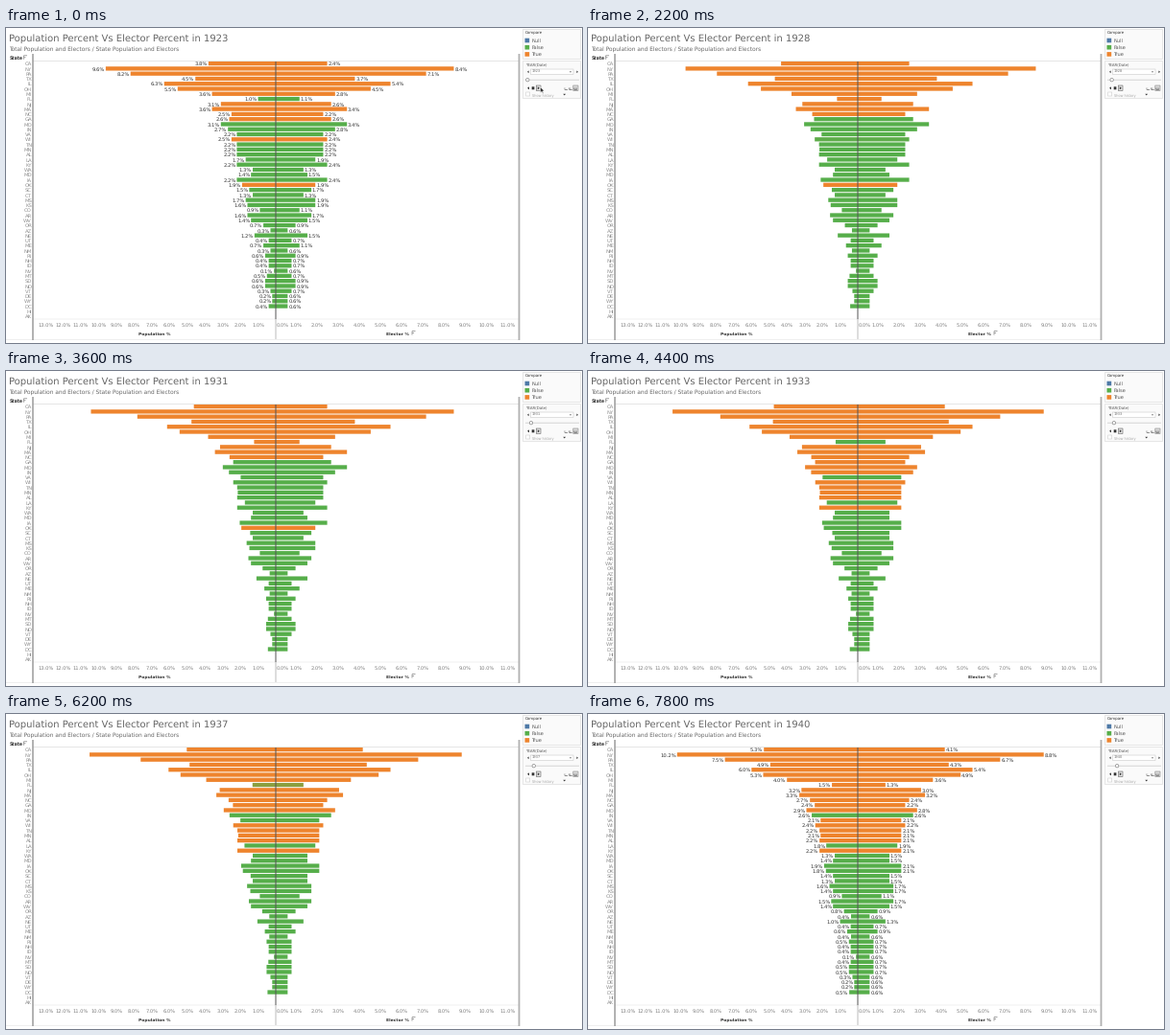
A matplotlib script that plays this animation: 600x329 px, repeating every 8 s.

```python
import numpy as np
import matplotlib.pyplot as plt
from matplotlib.animation import FuncAnimation
from matplotlib.colors import to_rgb
from matplotlib.patches import Circle, Polygon, Rectangle

W, H, DPI = 600, 329, 100
FRAMES, STEP = 40, 200
FIRST, MID, LAST, SEATS_CHANGE = 1923, 1930, 1940, 1932
FRAMES_PER_YEAR, LEAD = 2.3, 1.6
SETTLE, LABEL_AT = 0.5, 0.6       # shares of a year
ZERO, LEFT_UNIT, RIGHT_UNIT = 281, 18.45, 22.05
TOP, PITCH, BAR = 37.1, 5.28, 4.3
HOUSE, ALL_SEATS = 435, 535

GREEN, ORANGE, BLUE = "#56ae4a", "#ee842d", "#4e79a7"
DARK, GREY, PALE = "#333333", "#808080", "#d8d8d8"
plt.rcParams["text.hinting"] = "none"

STATES = ("CA NY PA TX IL OH MI FL NJ MA NC GA MO IN VA WI TN MN AL LA KY WA "
          "MD IA OK SC CT MS KS CO AR WV OR AZ NE UT ME NM RI NH ID NV MT SD "
          "ND VT DE WY DC HI AK").split()
N = len(STATES) - 2               # the last two have no data

# population share in the first year, in percent
start = [3.8, 9.6, 8.2, 4.54, 6.3, 5.54, 3.6, 1, 3.1, 3.6, 2.5, 2.63, 3.1, 2.7,
         2.2, 2.5, 2.2, 2.2, 2.2, 1.7, 2.2, 1.3, 1.4, 2.2, 1.9, 1.5, 1.3, 1.7,
         1.6, .9, 1.6, 1.4, .7, .3, 1.2, .4, .7, .3, .6, .4, .4, .1, .5, .6, .6,
         .3, .2, .2, .4]
# change of the share up to the last year; half of it happens by MID
drift = {1.5: "CA", .6: "NY", .46: "FL", .4: "TX MI", .2: "NC",
         .08: "NJ LA OR AZ NM DC", -.04: "TN AL KY",
         -.1: "IN VA WI MN OK SC MS AR ME RI MT SD ND",
         -.2: "OH GA MO NE KS", -.3: "IL MA IA", -.7: "PA"}
bends = dict(NY={1929: 9.75, 1930: 10.42, 1939: 10.55},
             FL={1926: 1.14, 1937: 1.325}, GA={1930: 2.4}, IN={1936: 2.61},
             VA={1930: 1.98, 1937: 2.0}, WI={1930: 2.4}, OK={1930: 1.96})
# early seats that lag behind the population
lag = {-6: "CA", -3: "MI", -2: "TX OH", -1: "NJ NC WA CT",
       1: "NY GA IN LA KY IA MS KS NE ME VT", 3: "MO"}

years = np.arange(FIRST, LAST + 1)


def spread(groups):
    by_name = {s: v for v, names in groups.items() for s in names.split()}
    return np.array([by_name.get(s, 0) for s in STATES[:N]])


def history(name, first, change):
    middle = bends.get(name, {MID: first + change / 2})
    keys = {FIRST: first, **middle, LAST: first + change}
    return np.interp(years, list(keys), list(keys.values()))


def apportion(p):
    return np.maximum(1, np.round(p * HOUSE / 100)) + 2


pop = np.array([history(*row) for row in zip(STATES, start, spread(drift))]).T
old_seats = apportion(pop[0]) + spread(lag)
new_seats = apportion(pop[MID - FIRST])
seats = np.where(years[:, None] < SEATS_CHANGE, old_seats, new_seats)
seats[:, STATES.index("DC")] = 3
share = seats / ALL_SEATS * 100
tint = np.where((pop > share)[..., None], to_rgb(ORANGE), to_rgb(GREEN))

fig = plt.figure(figsize=(W / DPI, H / DPI), dpi=DPI, facecolor="white")
ax = fig.add_axes([0, 0, 1, 1])
ax.axis("off")


def text(x, y, s, px, color=DARK, ha="left", **kw):
    return ax.text(x, y, s, fontsize=px * 72 / DPI, color=color, ha=ha,
                   va="center_baseline", family="DejaVu Sans", **kw)


def line(x0, y0, x1, y1, color=PALE, width=1.0):
    ax.plot([x0, x1], [y0, y1], color=color, lw=width * 72 / DPI,
            solid_capstyle="butt", zorder=3, snap=False)


def box(x0, y0, x1, y1, face="none", edge="none", width=0.6):
    ax.add_patch(Rectangle((x0, y0), x1 - x0, y1 - y0, fc=face, ec=edge,
                           lw=width * 72 / DPI, snap=False))


def shape(points, color=DARK):
    ax.add_patch(Polygon(points, fc=color, lw=0, snap=False))


def sort_icon(x, y):
    line(x, y - 2, x, y + 2, GREY, 0.7)
    line(x, y - 2, x + 3.5, y - 2, GREY, 0.7)
    line(x, y, x + 2, y, GREY, 0.7)


# headings and frame of the chart
title = text(3, 10.2, "", 10.05, "#666666")
text(3, 21, "Total Population and Electors / State Population and Electors",
     5.9, "#666666")
text(4, 31, "State", 4.6, DARK, weight="bold")
sort_icon(18.5, 30.8)
line(28, 34.5, 534, 34.5, "#e6e6e6")
line(28, 304, 534, 304, "#ececec", 0.8)
line(0, 325.5, 534, 325.5, "#ececec", 0.8)
line(28, 27, 28, 326, "#999999", 1.5)
line(534.5, 27, 534.5, 326, "#b0b0b0", 1.8)
line(ZERO, 35, ZERO, 304, "#555555", 1.0)
line(ZERO, 304, ZERO, 325, "#aaaaaa", 0.8)

rows = TOP + PITCH * np.arange(len(STATES))
for y, name in zip(rows, STATES):
    text(27, y + 0.3, name, 5.2, "#909090", "right")
for p in range(1, 14):
    text(ZERO - LEFT_UNIT * p, 310, f"{p:.1f}%", 5.15, GREY, "center")
text(288, 310, "0.0%", 5.15, GREY, "center")
for p in range(1, 12):
    text(ZERO + RIGHT_UNIT * p - 1, 310, f"{p:.1f}%", 5.15, GREY, "center")
text(154.5, 319, "Population %", 4.45, DARK, "center", weight="bold")
text(396, 319, "Elector %", 4.45, DARK, weight="bold")
sort_icon(423, 318.6)

# legend card
box(538.5, 1.5, 598.5, 32.5, "#fafafa", PALE)
text(541, 5, "Compare", 4)
for y, c, name in ((13, BLUE, "Null"), (20.2, GREEN, "False"),
                   (27.4, ORANGE, "True")):
    box(540.5, y - 2.3, 545.2, y + 2.3, face=c)
    text(547, y, name, 5.1, "#555555")

# year card
box(538.5, 34.5, 598.5, 73.5, "#fafafa", PALE)
text(541, 38.2, "YEAR(Date)", 3.9, "#555555")
box(546.5, 43, 591, 48.5, "white", "#cccccc")
year_box = text(548, 45.9, "", 3.6, "#777777")
shape([(543, 45.8), (544.6, 44.5), (544.6, 47.1)])
shape([(596, 45.8), (594.4, 44.5), (594.4, 47.1)])
shape([(586.8, 45.2), (589.2, 45.2), (588, 46.8)], GREY)
line(541, 54.2, 597, 54.2, "#cccccc", 0.8)
knob = Circle((543.3, 54.2), 1.7, fc="white", ec="#888888", lw=0.5, zorder=4)
ax.add_patch(knob)
shape([(543, 62.8), (545, 61.3), (545, 64.3)])
box(547.7, 61.3, 550.4, 64.3, face=DARK)
box(552.3, 60, 557, 65.4, "#e4e4e4", "#666666")
shape([(553.8, 61.2), (553.8, 64.4), (555.8, 62.8)])
box(590.8, 60, 596, 65.4, "#dcdcdc", "#888888")
for k, x in enumerate((582, 586.7, 591.8)):
    for j in range(k + 1):
        line(x + 1.2 * j, 62.4, x + 1.2 * j, 64.4, "#666666", 0.6)
    line(x, 64.4, x + 3, 64.4, "#666666", 0.7)
box(541.7, 67, 545.7, 71, "white", "#d0d0d0")
text(548.5, 69.2, "Show history", 3.5, "#a8a8a8")
shape([(580.3, 68.8), (583.1, 68.8), (581.7, 70.4)])
pointer = ax.add_patch(Polygon([(556.5, 61.5), (556.5, 67.8), (558, 66.4),
                                (559.2, 68.8), (560.1, 68.3), (559, 66),
                                (561, 65.8)], fc="#333333", ec="white",
                               lw=0.4, zorder=6))

left_bars, right_bars = (
    ax.barh(rows[:N], np.zeros(N), BAR, left=ZERO, lw=0, snap=False)
    for _ in range(2))
left_tags = [text(0, y + 0.2, "", 5.25, DARK, "right") for y in rows[:N]]
right_tags = [text(0, y + 0.2, "", 5.25, DARK) for y in rows[:N]]
ax.set_xlim(0, W)
ax.set_ylim(H, 0)


def set_side(bar, tag, value, unit, color, shown):
    bar.set_width(value * unit)
    bar.set_facecolor(color)
    tag.set_visible(shown)
    tag.set_x(ZERO + value * unit + np.copysign(0.8, unit))
    tag.set_text(f"{value:.1f}%")


def draw(n):
    clock = (n + LEAD) / FRAMES_PER_YEAR
    now = min(int(clock), LAST - FIRST)
    phase = clock - now
    was = max(now - 1, 0)
    k = min(1, phase / SETTLE)
    shown = phase > LABEL_AT

    def mix(a):
        return a[was] * (1 - k) + a[now] * k

    title.set_text(f"Population Percent Vs Elector Percent in {FIRST + now}")
    year_box.set_text(str(FIRST + now))
    knob.center = (543.3 + 0.46 * now, 54.2)
    pointer.set_visible(n == 0)
    for i, (p, e, color) in enumerate(zip(mix(pop), mix(share), mix(tint))):
        set_side(left_bars[i], left_tags[i], p, -LEFT_UNIT, color, shown)
        set_side(right_bars[i], right_tags[i], e, RIGHT_UNIT, color, shown)
    return []


anim = FuncAnimation(fig, draw, frames=FRAMES, interval=STEP, repeat=True,
                     repeat_delay=0, init_func=lambda: draw(0), blit=False)
plt.show()
```
